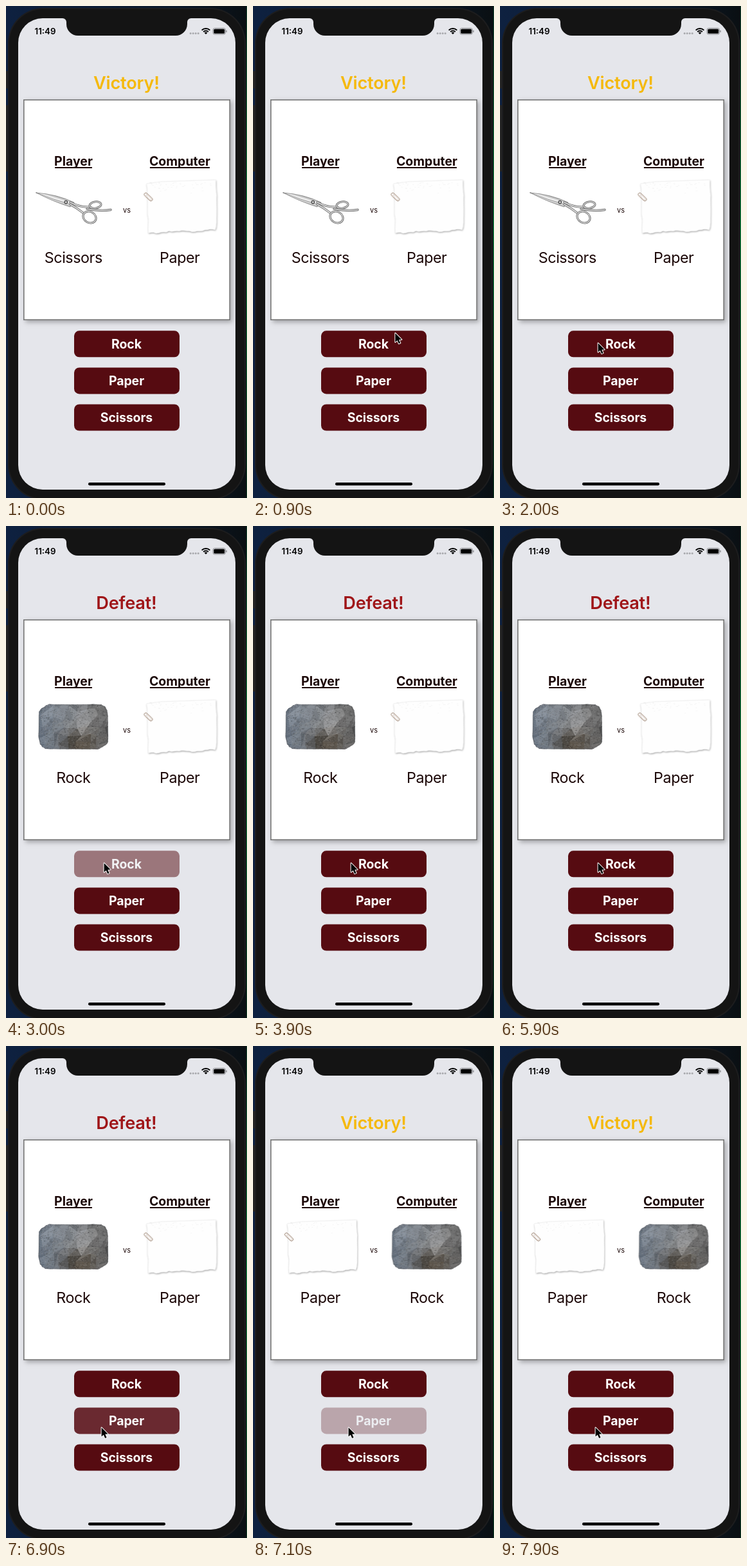
Animation of 375x764 px, one loop 8 s. Source, as an HTML page with a canvas:

```html
<!DOCTYPE html>
<html lang="en">
<head>
<meta charset="utf-8">
<title>Rock Paper Scissors</title>
<style>
  html, body { margin: 0; width: 100%; height: 100%; overflow: hidden; background: #151515; }
  canvas { display: block; width: 375px; height: 764px; }
</style>
</head>
<body>
<canvas id="stage"></canvas>
<script>
const W = 375, H = 764, LOOP = 8000, STEP = 100;
const RED = '#560b11', INK = '#1c0808', SCREEN = '#e5e6eb', BEZEL = '#141414';
const GOLD = '#f5b90b', CRIMSON = '#9f1518';
const dpr = window.devicePixelRatio || 1;

function setup(canvas, w, h) {
  canvas.width = w * dpr;
  canvas.height = h * dpr;
  const c = canvas.getContext('2d');
  c.scale(dpr, dpr);
  return c;
}

function layer(w, h, ...parts) {
  const canvas = document.createElement('canvas');
  const c = setup(canvas, w, h);
  parts.forEach(part => part(c));
  return canvas;
}

const ctx = setup(document.getElementById('stage'), W, H);

function seeded(seed) {
  return () => (seed = (seed * 16807) % 2147483647) / 2147483647;
}

const clamp = v => Math.min(1, Math.max(0, v));
const smooth = p => p * p * (3 - 2 * p);
const easeOut = p => 1 - (1 - p) ** 3;
const easeBack = p => 1 + 2.7 * (p - 1) ** 3 + 1.7 * (p - 1) ** 2;

function box(c, x, y, w, h, r, fill) {
  c.beginPath();
  c.roundRect(x, y, w, h, r);
  c.fillStyle = fill;
  c.fill();
}

function trace(c, pts) {
  c.beginPath();
  pts.forEach(([x, y]) => c.lineTo(x, y));
  c.closePath();
}

function stroke(c, color, width) {
  c.strokeStyle = color;
  c.lineWidth = width;
  c.stroke();
}

function shadow(c, alpha, blur, dx, dy) {
  c.shadowColor = `rgba(0,0,0,${alpha})`;
  c.shadowBlur = blur * dpr;
  c.shadowOffsetX = dx * dpr;
  c.shadowOffsetY = dy * dpr;
}

function label(c, text, x, y, size, weight, color, spacing = 0) {
  c.font = `${weight} ${size}px Inter, Roboto, sans-serif`;
  c.letterSpacing = spacing + 'px';
  c.textAlign = 'center';
  c.fillStyle = color;
  c.fillText(text, x + spacing / 2, y);
  return c.measureText(text).width - spacing;
}

function heading(c, text, x) {
  const w = label(c, text, x, 248, 19.5, 700, INK);
  c.fillRect(x - w / 2 + 1, 250, w - 2, 2);
}

function drawDesktop(c) {
  const sky = c.createLinearGradient(0, 0, W, 0);
  sky.addColorStop(0, '#0e2140');
  sky.addColorStop(0.7, '#0c1a2c');
  sky.addColorStop(1, '#0a0f12');
  c.fillStyle = sky;
  c.fillRect(0, 0, W, H);
  c.fillStyle = '#242424';
  c.fillRect(0, 101, 5, 27);
  c.fillRect(0, 154, 5, 103);

  const edge = c.createLinearGradient(0, 0, 0, H);
  edge.addColorStop(0, '#0c3a26');
  edge.addColorStop(0.45, '#12a048');
  edge.addColorStop(1, '#08351d');
  c.fillStyle = edge;
  c.fillRect(374, 0, 1, H);
}

function drawStatus(c) {
  label(c, '11:49', 61, 44, 13.3, 600, '#000');
  for (let i = 0; i < 4; i++) box(c, 285.7 + i * 4, 41, 3, 3, 1.5, '#a9aaae');

  const wave = r => {
    c.beginPath();
    c.arc(311, 44, r, -Math.PI * 0.75, -Math.PI * 0.25);
  };
  for (const r of [9, 5.5]) {
    wave(r);
    stroke(c, '#000', 2);
  }
  wave(3.4);
  c.lineTo(311, 44);
  c.fillStyle = '#000';
  c.fill();

  c.beginPath();
  c.roundRect(322, 34.5, 19.5, 9.5, 2.6);
  stroke(c, '#8b8c90', 1);
  box(c, 323.3, 35.8, 16.9, 6.9, 1.5, '#000');
  box(c, 342.4, 37.7, 1.3, 3.2, 0.7, '#8b8c90');
}

function drawPhone(c) {
  box(c, 3, 3, 370, 764, 55, '#1d1d1e');
  box(c, 5, 5, 366, 760, 53, BEZEL);
  box(c, 19, 19, 338, 732, 38, SCREEN);

  // Notch
  c.beginPath();
  c.moveTo(84, 19);
  c.arcTo(94, 19, 94, 28, 6);
  c.arcTo(94, 46, 120, 46, 18);
  c.arcTo(282, 46, 282, 28, 18);
  c.arcTo(282, 19, 292, 19, 6);
  c.lineTo(292, 18);
  c.lineTo(84, 18);
  c.fillStyle = BEZEL;
  c.fill();

  drawStatus(c);
  box(c, 128, 740, 120, 4.4, 2.2, '#000');
}

function drawCard(c) {
  c.save();
  shadow(c, 0.3, 7, 2.5, 3);
  c.fillStyle = '#757575';
  c.fillRect(27, 145, 322, 343);
  c.restore();
  c.fillStyle = '#fff';
  c.fillRect(28.6, 146.6, 318.8, 339.8);
  heading(c, 'Player', 105);
  heading(c, 'Computer', 270.5);
  label(c, 'vs', 188, 320.5, 11, 400, INK);
}

function drawScissors(c) {
  c.lineCap = c.lineJoin = 'round';
  const steel = c.createLinearGradient(72, 292, 68, 305);
  steel.addColorStop(0, '#999');
  steel.addColorStop(0.4, '#f6f6f6');
  steel.addColorStop(1, '#999');

  const blade = (endX, endY, bow) => {
    c.beginPath();
    c.moveTo(47, 290);
    c.quadraticCurveTo(78, 292 + bow, endX, endY - 2);
    c.lineTo(endX - 2, endY + 2);
    c.quadraticCurveTo(74, 301 + bow, 47, 290);
    c.fillStyle = steel;
    c.fill();
    stroke(c, '#777', 0.7);
  };
  blade(102, 310, 3);
  blade(106, 307, 0);

  const metal = (width, path) => {
    c.beginPath();
    path();
    stroke(c, '#666', width);
    stroke(c, '#dedede', width - 1.7);
  };
  const arm = (x0, y0, x1, y1, x2, y2) => metal(3.4, () => {
    c.moveTo(x0, y0);
    c.quadraticCurveTo(x1, y1, x2, y2);
  });
  const ring = (x, y, rx, ry, turn) => metal(3, () => c.ellipse(x, y, rx, ry, turn, 0, 7));
  arm(100, 305, 116, 313, 131, 312);
  arm(100, 308, 111, 314, 121, 322);
  ring(139, 309, 9, 5, -0.15);
  ring(130, 328, 10.5, 8.5, 0.5);
  arm(126, 315, 146, 319, 163, 316.5);

  box(c, 90.5, 301.8, 5.6, 5.6, 2.8, '#444');
  box(c, 91.8, 303.1, 3, 3, 1.5, '#e0e0e0');
}

function drawPaper(c) {
  const rnd = seeded(41);
  const edge = [[53, 276], [75, 273], [161, 270]];
  for (let y = 280; y < 348; y += 7) edge.push([161 + rnd() * 1.3, y]);
  for (let x = 160; x > 55; x -= 4) {
    edge.push([x, 348 + (160 - x) * 0.035 + Math.sin(x / 9) + (rnd() - 0.5) * 2]);
  }
  for (let y = 345; y > 280; y -= 7) edge.push([53 + (y - 280) * 0.04 + rnd() * 1.2, y]);

  trace(c, edge);
  c.fillStyle = '#fefefe';
  c.save();
  shadow(c, 0.36, 2.6, 0.6, 1.3);
  c.fill();
  c.restore();
  stroke(c, '#ececec', 0.6);
  c.fillStyle = 'rgba(120,120,120,.1)';
  for (let i = 0; i < 45; i++) {
    c.fillRect(55 + rnd() * 103, 274 + rnd() * rnd() * 18, 1.5, 0.8);
  }

  // Paper clip
  c.translate(56, 296.5);
  c.rotate(0.76);
  c.beginPath();
  c.roundRect(-8, -2.6, 16, 5.2, 2.6);
  stroke(c, '#98816f', 0.9);
  c.beginPath();
  c.roundRect(-5, -1.2, 11, 2.6, 1.3);
  stroke(c, '#cbb7aa', 0.7);
}

function drawRock(c) {
  const rnd = seeded(77);
  const power = v => Math.sign(v) * Math.abs(v) ** 0.36;
  const outline = [];
  for (let i = 0; i < 60; i++) {
    const a = i * Math.PI / 30;
    const y = power(Math.sin(a));
    outline.push([
      105 + 54 * power(Math.cos(a)) - y * 0.8 + Math.sin(a * 5) + rnd() - 0.5,
      311.7 + 35 * y + Math.sin(a * 7) * 0.7 + rnd() - 0.5
    ]);
  }
  trace(c, outline);
  c.save();
  c.clip();

  // Facets on a jittered grid: bright ridge, cool left, dark brown foot
  const hill = (x, y, cx, cy, w) => Math.exp(-(((x - cx) / w) ** 2) - ((y - cy) / w) ** 2);
  const tone = (x, y) => {
    const v = 112 + 44 * hill(x, y, 122, 304, 20) + 26 * hill(x, y, 78, 290, 28)
      - 42 * hill(x, y, 112, 341, 19) - 30 * hill(x, y, 157, 325, 24) + (rnd() - 0.5) * 30;
    const cool = 13 - 13 * clamp((x - 55) / 85) - 14 * hill(x, y, 112, 341, 26);
    return `rgb(${v - cool * 0.8},${v},${v + cool})`;
  };
  const nodes = [];
  for (let i = 0; i < 10; i++) {
    nodes.push([]);
    for (let j = 0; j < 7; j++) {
      nodes[i].push([44 + i * 14 + (rnd() - 0.5) * 11, 270 + j * 14 + (rnd() - 0.5) * 11]);
    }
  }
  const facet = (...pts) => {
    const [x, y] = [0, 1].map(k => pts.reduce((sum, p) => sum + p[k], 0) / 3);
    trace(c, pts);
    c.fillStyle = tone(x, y);
    c.fill();
    stroke(c, c.fillStyle, 1);
  };
  for (let i = 0; i < 9; i++) {
    for (let j = 0; j < 6; j++) {
      const a = nodes[i][j], b = nodes[i + 1][j], d = nodes[i][j + 1], e = nodes[i + 1][j + 1];
      facet(a, b, d);
      facet(b, e, d);
    }
  }
  for (let i = 0; i < 2200; i++) {
    const v = rnd() * 200;
    c.fillStyle = `rgba(${v},${v},${v},${0.08 + rnd() * 0.2})`;
    c.fillRect(48 + rnd() * 114, 275 + rnd() * 74, 0.8 + rnd() * 1.6, 0.7 + rnd());
  }
  c.restore();
  trace(c, outline);
  stroke(c, 'rgba(50,54,58,.4)', 1);
}

const backdrop = layer(W, H, drawDesktop, drawPhone, drawCard);
const pictures = {
  Rock: layer(180, 360, drawRock),
  Paper: layer(180, 360, drawPaper),
  Scissors: layer(180, 360, drawScissors)
};

const rounds = [
  { at: 0, title: 'Victory!', color: GOLD, player: 'Scissors', computer: 'Paper' },
  { at: 2900, title: 'Defeat!', color: CRIMSON, player: 'Rock', computer: 'Paper' },
  { at: 7100, title: 'Victory!', color: GOLD, player: 'Paper', computer: 'Rock' }
];

// Each press is dimmest at its time
const presses = { Rock: [2850, 5000], Paper: [7025], Scissors: [] };

function opacity(name, t) {
  const levels = presses[name].map(at => {
    const dt = t - at;
    return 0.2 + 0.8 * smooth(clamp(dt < 0 ? -dt / 170 : dt / 350));
  });
  return Math.min(1, ...levels);
}

const REST = [152, 522.5];
const moves = [
  { start: 600, end: 1500, from: [384, 470], to: REST, ease: easeOut },
  { start: 6400, end: 6900, from: REST, to: [148, 591.5], ease: easeBack }
];

function drawChoice(name, x) {
  ctx.drawImage(pictures[name], x - 105, 0, 180, 360);
  label(ctx, name, x, 399, 23.3, 400, INK, -0.45);
}

function drawButton(name, y, alpha) {
  box(ctx, 106, y, 164, 41, 8, RED);
  label(ctx, name, 187.5, y + 27.6, 19.5, 700, '#fff', -0.1);
  // Veil in the screen colour fades button and text together
  ctx.globalAlpha = 1 - alpha;
  if (alpha < 1) box(ctx, 105, y - 1, 166, 43, 8, SCREEN);
  ctx.globalAlpha = 1;
}

function drawCursor(t) {
  const move = moves.filter(m => m.start < t).pop();
  if (!move) return;
  const p = move.ease(clamp((t - move.start) / (move.end - move.start)));
  const [x, y] = move.from.map((v, i) => v + (move.to[i] - v) * p);
  ctx.save();
  ctx.translate(x, y);
  ctx.lineJoin = 'round';
  trace(ctx, [[0.6, 1], [0.6, 15], [3.8, 12.2], [6.2, 17.4], [8.6, 16.4], [6.3, 11.2], [10.6, 11.1]]);
  stroke(ctx, '#fff', 2);
  ctx.fillStyle = '#000';
  ctx.fill();
  ctx.restore();
}

function draw(t) {
  ctx.drawImage(backdrop, 0, 0, W, H);
  const round = rounds.filter(r => r.at <= t).pop();
  label(ctx, round.title, 187.5, 129, 27.2, 600, round.color, -0.25);
  drawChoice(round.player, 105);
  drawChoice(round.computer, 270.5);
  Object.keys(presses).forEach((name, i) => {
    drawButton(name, 504.3 + i * 57.1, opacity(name, t));
  });
  drawCursor(t);
}

const start = performance.now();

function tick() {
  const t = (performance.now() - start) % LOOP;
  draw(Math.floor(t / STEP) * STEP);
  requestAnimationFrame(tick);
}
tick();
</script>
</body>
</html>
```
